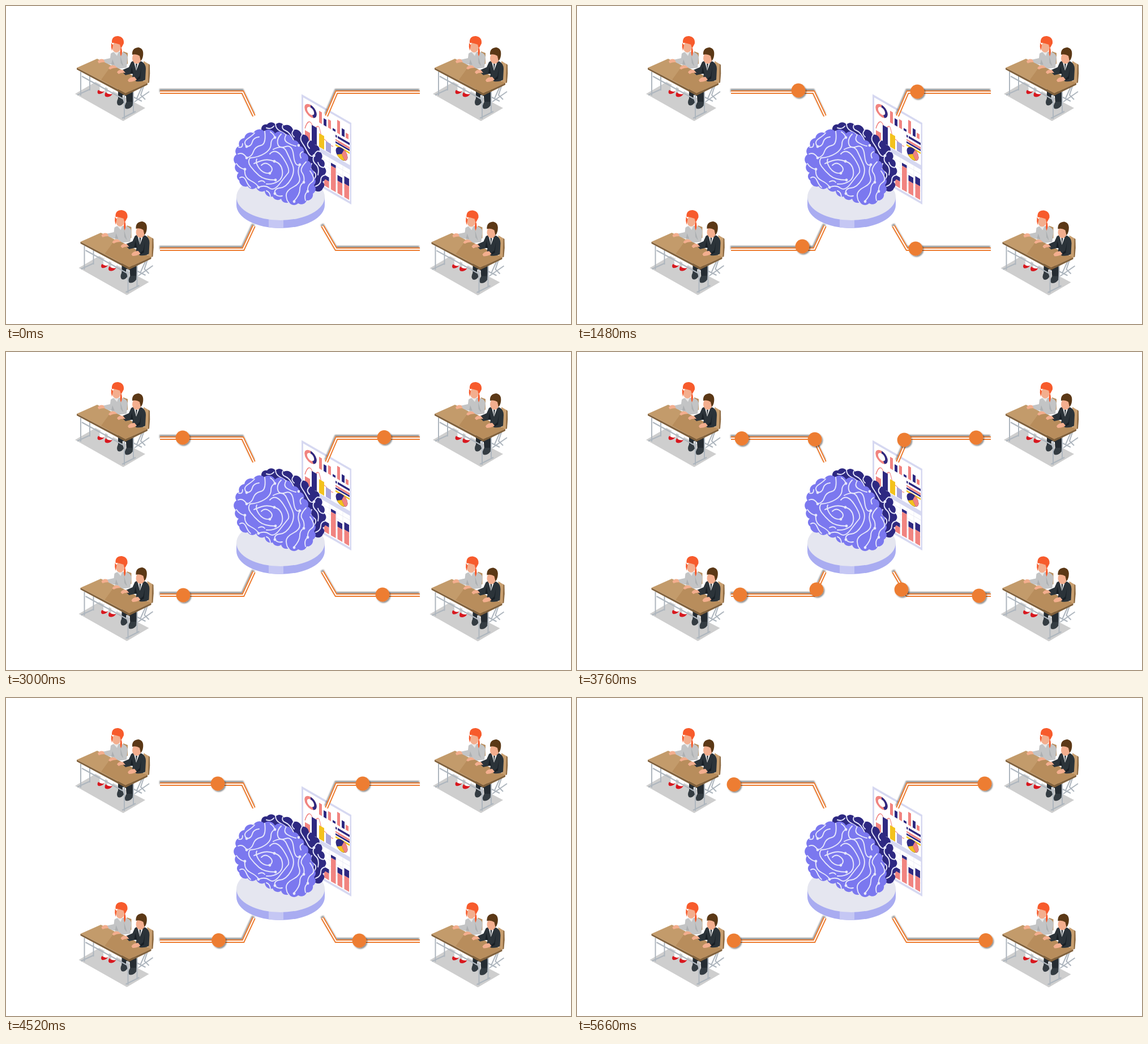
Write an HTML page that moves like this. It is 998x561 px and loops after 6.04 s.

```html
<!DOCTYPE html>
<html lang="en">
<head>
<meta charset="utf-8">
<title>Classroom network</title>
<style>
html, body { margin: 0; width: 100%; height: 100%; overflow: hidden; background: #fff; }
svg { display: block; width: 100vw; height: 100vh; }
.wire { fill: none; stroke: #ed7d31; stroke-width: 6; }
.gap { fill: none; stroke: #fff; stroke-width: 2; }
.ball { fill: #ed7d31; filter: url(#ballShade); }
.groove { fill: none; stroke: #e6e7fa; stroke-width: 1.9; stroke-linecap: round; stroke-linejoin: round; }
.pink { fill: #f18480; }
.navy { fill: #2e2981; }
.gold { fill: #f3c21d; }
.steel { fill: none; stroke: #aeb6be; stroke-width: 2; }
.skin { fill: #f3ae8e; }
</style>
</head>
<body>
<svg viewBox="0 0 998 561">
  <defs>
    <filter id="wireShade" filterUnits="userSpaceOnUse" x="0" y="0" width="998" height="561">
      <feDropShadow dx="-1" dy="-3" stdDeviation="1.3" flood-color="#000" flood-opacity=".4"/>
    </filter>
    <filter id="ballShade" x="-30%" y="-30%" width="170%" height="170%">
      <feDropShadow dx="1.8" dy="2" stdDeviation="1.2" flood-color="#000" flood-opacity=".45"/>
    </filter>
    <g id="desk">
      <path fill="#cecece" d="M122 155L158 134L246 180L207 203Z"/>
      <!-- chairs -->
      <path fill="#b98f5f" d="M207 80L215 83V102L209 104Z"/>
      <path fill="#c89f70" d="M243 97L253 103Q255 118 252 135L244 139Z"/>
      <path fill="#8d6a42" d="M252 102L254 104Q255 119 253 135L251 136Z"/>
      <path class="steel" d="M227 169L253 151M240 143L231 163M244 139L238 157L246 165M224 160L240 168"/>
      <!-- legs and shoes -->
      <path fill="#fff" d="M165 140L176 138L174 152L166 150ZM180 143L191 145L186 157L179 154Z"/>
      <path fill="#d8181f" d="M163 148Q160 152 163 155Q170 156 174 150Q169 153 163 148ZM176 152Q173 157 176 160Q184 162 188 155Q181 157 176 152Z"/>
      <path fill="#252c32" d="M198 146L225 152L224 173L213 172L212 159L206 157L205 168L198 165Z"/>
      <path fill="#343c42" d="M198 163Q194 171 198 175Q204 177 208 170L206 163ZM213 169Q208 176 211 181Q219 183 224 175L223 169Z"/>
      <!-- girl -->
      <path fill="#c3c4c5" d="M185 84Q190 79 201 81Q213 81 215 90L213 109L195 111L188 104L173 101L170 95L184 92Z"/>
      <path fill="#adb0b2" d="M188 94L192 104L186 103ZM202 88L207 105L203 109Z"/>
      <path fill="#e9e9e9" d="M190 81L199 81L196 88Z"/>
      <ellipse class="skin" cx="195" cy="73" rx="7.5" ry="9"/>
      <path fill="#f75b2c" d="M187 65Q186 53 198 53Q209 55 208 66Q205 72 203 75L201 68Q193 65 187 65ZM186 65Q185 72 187 79L189 69ZM203 72Q207 80 203 89Q200 82 203 72Z"/>
      <!-- desk -->
      <path class="steel" d="M132 116V158M148 124V149M126 157L148 147M209 155V199M225 147V188M205 198L229 186M134 124L207 164"/>
      <path fill="#c39b6b" d="M125 109L161 93L250 136L211 154Z"/>
      <path fill="#b88d5c" d="M168 130L187 104L250 136L211 154Z"/>
      <path fill="#80603b" d="M125 109L211 154L250 136V139L211 158L125 112Z"/>
      <path class="skin" d="M162 98Q165 92 172 94L175 99Q168 99 164 101ZM181 110Q184 104 192 105L197 109Q188 109 184 112Z"/>
      <path fill="#c3c4c5" d="M191 103L203 101L209 109L198 110Z"/>
      <!-- boy -->
      <path fill="#2b3339" d="M221 99Q227 94 240 98Q247 102 247 111L246 130Q240 134 230 133L223 126L224 119L211 122L203 114L217 108Z"/>
      <path fill="#181f25" d="M222 107L225 120L220 119ZM239 109L237 128L230 132L231 128L236 124Z"/>
      <path fill="#f4f4f4" d="M226 99L235 101L230 114Z"/>
      <path fill="#353d44" d="M229 101L232 102L230 113Z"/>
      <ellipse class="skin" cx="231" cy="92" rx="8" ry="10"/>
      <path fill="#5b3816" d="M223 86Q222 74 234 73Q244 75 242 88Q241 94 238 97L236 88Q230 84 223 86Z"/>
      <path class="skin" d="M196 117Q199 111 207 113L211 118Q203 117 199 120ZM215 131Q218 125 227 125L231 130Q225 134 217 134Z"/>
    </g>
  </defs>

  <use href="#desk"/>
  <use href="#desk" x="632"/>
  <use href="#desk" x="6.5" y="307"/>
  <use href="#desk" x="626.5" y="307.5"/>

  <!-- chart board -->
  <g transform="translate(523 156) skewY(30)">
    <path fill="#d6d8f1" d="M-1 0H87V144H-1Z"/>
    <path fill="#fff" d="M2 4H84.500V76H2ZM2 84H84.500V140H2Z"/>
    <circle cx="15" cy="20.500" r="8.500" fill="none" stroke="#f18480" stroke-width="4.500"/>
    <path d="M15 12A8.500 8.500 0 0 1 19 28" fill="none" stroke="#2e2981" stroke-width="4.500"/>
    <path class="pink" d="M30 11.500h5V32h-5ZM46 17h5V32h-5ZM62 9h5V32h-5ZM77 23h5V32h-5Z"/>
    <path class="navy" d="M38 20h5V32h-5ZM54 28h5V32h-5ZM70 19h5V32h-5Z"/>
    <path d="M5 57C9 42 14 36 18 44S24 43 28 40S33 60 38 57S46 64 55 60" fill="none" stroke="#f18480" stroke-width="1.300"/>
    <path class="pink" d="M5 60h9V75h-9ZM59 44.500H84V48H63V47H59Z"/>
    <path class="navy" d="M17 44h9V75h-9ZM59 37h2.500v4h-2.500ZM63 37H84v4H63ZM59 48.500H84v3H59Z"/>
    <path class="gold" d="M30 51h9V75h-9ZM59 53.500H84v3H59Z"/>
    <path fill="#a7a4dc" d="M42 58h9V75h-9Z"/>
    <circle class="navy" cx="70" cy="64.500" r="10.500"/>
    <path class="gold" d="M70 64.500L61.500 70.500A10.500 10.500 0 0 0 75.500 73.500Z"/>
    <path class="pink" d="M70 64.500L75.500 73.500A10.500 10.500 0 0 0 74 55Z"/>
    <path d="M36 92H84M36 102H84M36 112H84M36 122H84M48 85V138M60 85V138M72 85V138" stroke="#e9e9f4" stroke-width=".8"/>
    <path class="pink" d="M39 126h8.500V138H39ZM51 96h8.500V138H51ZM62.500 116h8.500V138h-8.500ZM74.500 114H83V138h-8.500Z"/>
    <path class="navy" d="M39 119h8.500v7H39ZM51 91h8.500v5H51ZM62.500 106h8.500v10h-8.500ZM74.500 101H83v13h-8.500Z"/>
  </g>

  <!-- pedestal -->
  <path fill="#a9acf1" d="M407 337V351A78 41 0 0 0 563 351V337Z"/>
  <path fill="#c5c7f4" d="M464 370H490V392Q476 392 464 390.500Z"/>
  <ellipse cx="485" cy="337" rx="78" ry="41" fill="#e5e6f0"/>

  <!-- brain -->
  <path id="back" fill="#2e2982"/>
  <path class="groove" stroke-width="1.500" d="M460 215Q468 218 473 212M476 208Q476 217 485 221T497 231M489 210Q486 217 494 220T509 239L517 246M508 219Q502 225 509 231M523 227Q518 234 523 241T533 258T544 264M536 238Q529 244 536 251M554 257Q549 253 544 264Q540 273 547 279T551 298M561 285Q553 284 551 276M565 298Q556 299 556 307T547 318M540 278Q535 287 543 292T544 306"/>
  <path id="front" fill="#7b78ef"/>
  <path class="groove" d="M425 248Q418 240 427 234T439 224M425 248Q433 248 435 240T447 231M425 268Q419 257 410 261M425 268Q434 266 437 257T450 246T457 221M422 288Q413 287 407 278M422 288Q420 302 432 308T446 320M413 303Q420 299 424 308T432 320M475 232Q468 235 468 244T457 260T431 268Q426 275 432 283T447 299T476 307M475 232Q473 226 467 222M474 274Q486 277 488 290T481 309T460 314M474 274Q462 269 451 273T438 278M466 295Q454 296 447 286T443 270M466 295Q474 288 466 281T451 281M446 320Q457 315 465 321T483 314T498 295T490 269T466 261M475 331Q473 322 484 321T503 306T506 280T495 256T472 253M475 331Q480 337 488 335M486 226Q478 234 480 243T494 248T508 264T519 280M495 227Q489 236 497 241T512 247M519 280Q514 290 518 301T508 319T495 335T499 346M526 311Q528 301 523 294T530 275M526 311Q519 315 519 324T508 345M533 327Q526 332 529 343M533 327Q532 316 540 311T537 291M524 257Q517 260 521 268M411 249Q418 251 418 243M446 310Q453 306 457 311M460 326Q466 328 467 336"/>
  <g id="nodes" fill="#e6e7fa"></g>

  <g id="wires" filter="url(#wireShade)"></g>
  <g id="balls"></g>
</svg>
<script>
const NS = 'http://www.w3.org/2000/svg';
const $ = id => document.getElementById(id);
const pairs = s => s.split(' ').map(p => p.split(',').map(Number));

function add(parent, tag, attrs) {
  const el = document.createElementNS(NS, tag);
  for (const k in attrs) el.setAttribute(k, attrs[k]);
  return parent.appendChild(el);
}

// Closed outline made of small outward arcs
function lobes(id, list) {
  const pts = pairs(list);
  let d = 'M' + pts[0];
  pts.forEach(([x, y], i) => {
    const [u, v] = pts[(i + 1) % pts.length];
    const r = Math.hypot(u - x, v - y) * 0.62;
    d += `A${r} ${r} 0 0 1 ${u} ${v}`;
  });
  $(id).setAttribute('d', d + 'Z');
}

lobes('back', '451,217 461,209 476,209 491,211 507,219 522,227 535,238 546,245 553,257 557,270 561,284 563,297 559,310 560,321 547,326 530,310 500,250 470,235');
lobes('front', '412,247 421,233 437,224 456,221 475,225 493,227 506,237 518,247 526,259 533,273 538,287 542,301 544,316 542,331 531,343 516,348 500,346 486,340 471,336 457,326 442,320 427,318 412,308 411,294 406,279 407,262');

for (const [cx, cy] of pairs('475,232 425,248 425,268 422,288 474,274 466,295 476,307 446,320 475,331 517,246 544,264 519,280 526,311 533,327 509,345'))
  add($('nodes'), 'circle', { cx, cy, r: 2.4 });

for (const d of ['M272 152H418L438 194', 'M731 152H584L566 194', 'M272 429H419L438 388', 'M731 429H583L559 388'])
  for (const cls of ['wire', 'gap']) add($('wires'), 'path', { class: cls, d });

// Each ball hops along its stops, starting at the given step
const trails = [
  [1, '432,185 423,165 407,152 391,149 377,151 358,151 334,151 312,151 296,152 291,152.5 277,152'],
  [1, '562,185 575,166 586,153 601,151 617,151 639,152 653,149 668,150.5 681,150 705,151 725,151'],
  [1, '433,389 427,406 415,418 398,424 379,427 358.5,427.5 333,428 313,429 294,428 288,428 276,428'],
  [1, '562,389 571,408 584,422 598,428 615,428 636,428 650,428 665,428 681,429 710,430 724,429'],
  [9, '432,180 420,154 397,152 374,151 348,151 306,152 277,152.5'],
  [9, '564,180 578,155 604,152 630,151 657,151 695,151 720,151'],
  [9, '433,394 423,419 399,427 375.5,427.5 348,428 306,428 277,428'],
  [9, '562,394 573,419 599,428 624,428 656,428 694,428 722,427.5']
].map(([start, list]) => ({
  start,
  stops: pairs(list),
  el: add($('balls'), 'circle', { class: 'ball', r: 12.4, visibility: 'hidden' })
}));

const LOOP = 6040, FIRST = 340, HOP = 380;

function draw(now) {
  const step = Math.floor(((now % LOOP) - FIRST) / HOP) + 1;
  for (const { start, stops, el } of trails) {
    const p = stops[step - start];
    el.setAttribute('visibility', p ? 'visible' : 'hidden');
    if (p) el.setAttribute('transform', `translate(${p})`);
  }
}

function tick() {
  draw(performance.now());
  requestAnimationFrame(tick);
}
tick();
</script>
</body>
</html>
```
